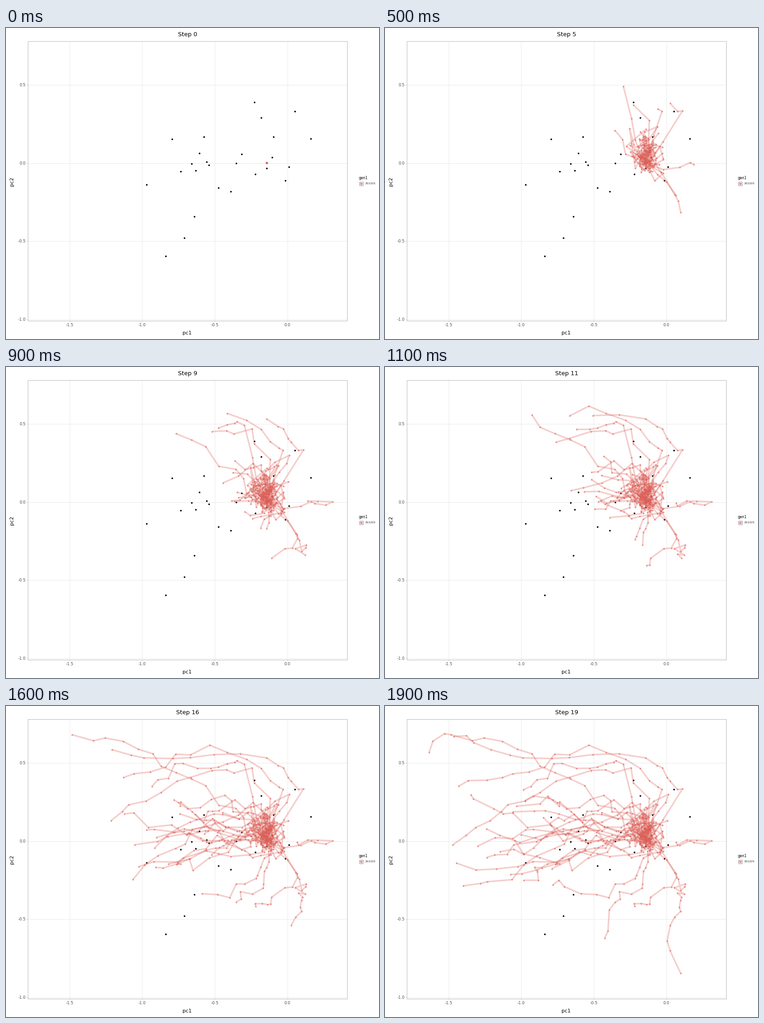
A matplotlib script that plays this animation: 820 px wide and 683 px high, repeating every 2000 ms.

```python
import numpy as np
import matplotlib.pyplot as plt
from matplotlib.animation import FuncAnimation
from matplotlib.collections import LineCollection
from matplotlib.patches import Rectangle

W, H, DPI = 820, 683, 64
STEPS = 20
RED, GREY, GRID = "#DB5F57", "#B8B8B8", "#E5E5E5"
LEFT, RIGHT, TOP, BOTTOM = 48, 750, 28.5, 642.5
START = np.array([573.0, 296.0])
HUB = np.array([573.0, 272.0])

plt.rcParams["font.family"] = "DejaVu Sans"
rng = np.random.default_rng(7)

FIXED = np.array([
    (546, 163), (635, 183), (561, 197), (365, 244), (435, 239), (588, 239),
    (670, 243), (425, 275), (518, 277), (585, 284), (408, 298), (441, 294),
    (446, 301), (506, 297), (573, 308), (622, 305), (384, 315), (417, 313),
    (548, 321), (614, 335), (309, 344), (467, 351), (494, 359), (414, 414),
    (392, 461), (351, 501)])

# Turning points of the widest walks: (step, x, y)
TURNS = [
    [(3, 654, 182), (9, 573, 114), (14, 303, 114), (19, 151, 67)],
    [(7, 439, 175), (11, 323, 105), (16, 145, 63), (19, 97, 102)],
    [(5, 524, 128), (11, 421, 137), (17, 304, 184)],
    [(4, 609, 183), (7, 561, 137), (10, 448, 86), (19, 162, 176)],
    [(4, 581, 203), (6, 541, 136), (11, 376, 165), (19, 149, 305)],
    [(7, 623, 194), (14, 476, 234)],
    [(3, 648, 306), (7, 718, 296), (11, 640, 299)],
    [(3, 637, 366), (9, 658, 413), (16, 627, 482), (19, 650, 587)],
    [(5, 640, 368), (10, 582, 435), (14, 549, 440)],
    [(10, 553, 372), (14, 492, 421), (19, 369, 393)],
    [(9, 573, 355), (15, 517, 424), (19, 483, 510)],
]


def leg(a, b, n, sd=10, power=1.0):
    """n random steps that end exactly on b."""
    t = (np.arange(1, n + 1) / n)[:, None]
    noise = np.cumsum(rng.normal(0, sd, (n, 2)), axis=0)
    return a + (b - a) * t ** power + noise - t * noise[-1]


def turn_walk(turns):
    """Ease out of the hub, then wander from turn to turn."""
    parts, here, now = [START[None]], START, 0
    for step, *goal in turns:
        goal = np.array(goal, float)
        parts.append(leg(here, goal, step - now, power=1 if now else 2))
        here, now = goal, step
    return np.vstack(parts)


def hub_walk(steps, sd=12):
    """Small steps that are pulled back to the hub."""
    path = [START]
    for _ in range(steps):
        path.append(path[-1] + 0.3 * (HUB - path[-1]) + rng.normal(0, sd, 2))
    return np.array(path)


def west_walk(t):
    """Linger in the hub, then head for a front on the left."""
    stay = rng.integers(4, 9)
    hub = hub_walk(stay)
    tip = np.array([rng.uniform(150, 400), 195 + 200 * t])
    return np.vstack([hub, leg(hub[-1], tip, STEPS - 1 - stay, 14, 1.15)])


walks = [turn_walk(turns) for turns in TURNS]
walks += [west_walk(t) for t in np.linspace(0, 1, 17)]
walks += [hub_walk(steps, 19) for steps in rng.integers(4, 9, 10)]

fig = plt.figure(figsize=(W / DPI, H / DPI), dpi=DPI, facecolor="white")
ax = fig.add_axes([0, 0, 1, 1])
ax.set(xlim=(0, W), ylim=(H, 0))
ax.axis("off")


def pt(px):
    return px * 72 / DPI


def label(x, y, text, size, color="black", va="baseline", **kw):
    return ax.text(x, y, text, fontsize=pt(size), color=color, va=va, **kw)


def line(xs, ys, color, width, **kw):
    ax.plot(xs, ys, color=color, lw=pt(width), solid_capstyle="butt", **kw)


def dots(points, radius, color, **kw):
    return ax.scatter(points[:, 0], points[:, 1], s=pt(2 * radius) ** 2,
                      color=color, linewidths=0, **kw)


for v in np.arange(-1.5, 0.1, 0.5):
    x = 618.5 + 319.2 * v
    line([x, x], [TOP, BOTTOM], GRID, 0.8, zorder=1)
    line([x, x], [BOTTOM, BOTTOM + 2.5], GREY, 0.8, zorder=1)
    label(x, 654.6, f"{v:.1f}", 8.8, "#4D4D4D", ha="center")
for v in np.arange(-1.0, 0.6, 0.5):
    y = 296.5 - 343 * v
    line([LEFT, RIGHT], [y, y], GRID, 0.8, zorder=1)
    line([LEFT - 2.5, LEFT], [y, y], GREY, 0.8, zorder=1)
    label(43.3, y + 3.3, f"{v:.1f}", 8.8, "#4D4D4D", ha="right")

ax.add_patch(Rectangle((LEFT, TOP), RIGHT - LEFT, BOTTOM - TOP, fill=False,
                       ec=GREY, lw=pt(1), zorder=6))
label(398.5, 673, "pc1", 11, ha="center")
label(13, 337, "pc2", 11, ha="center", va="center", rotation=90)
title = label(399, 18.3, "", 13, ha="center")

label(775.8, 331.5, "gen1", 7.9)
label(789.3, 343.3, "211221", 6)
ax.add_patch(Rectangle((776.5, 337.5), 8, 8, fc="white", ec="#7F7F7F",
                       lw=pt(0.8), zorder=2))
line([777, 784], [341.5, 341.5], RED, 3.6, alpha=0.3, zorder=3)
dots(np.array([[780.5, 341.5]]), 2.5, RED, alpha=0.6, zorder=4)

dots(FIXED + 0.3, 1.8, "black", zorder=2)
trails = LineCollection([], colors=RED, linewidths=pt(3.4), alpha=0.3,
                        zorder=3, capstyle="butt")
ax.add_collection(trails, autolim=False)
marks = dots(START[None], 1.8, RED, alpha=0.6, zorder=4)


def draw(step):
    shown = [w[:step + 1] for w in walks]
    trails.set_segments(shown if step else [])
    marks.set_offsets(np.vstack(shown))
    title.set_text(f"Step {step}")
    return trails, marks, title


anim = FuncAnimation(fig, draw, frames=STEPS, interval=100, repeat=True,
                     repeat_delay=0, init_func=lambda: draw(0))
plt.show()
```
